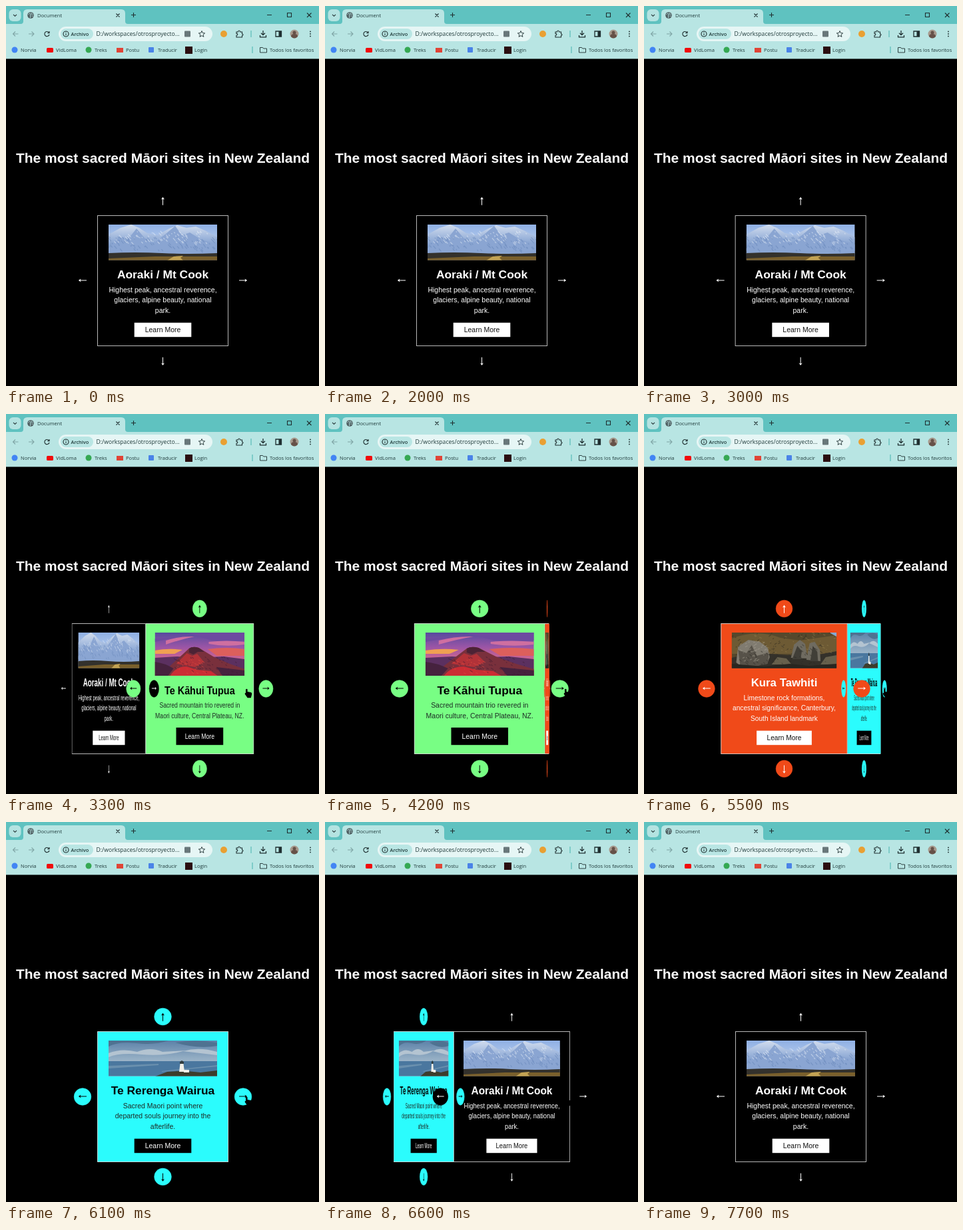
Write an HTML page that moves like this. It is 470 by 572 pixels and loops after 8 s.

```html
<!DOCTYPE html>
<html lang="en">
<head>
<meta charset="utf-8">
<title>Document</title>
<style>
html, body { margin: 0; width: 100%; height: 100%; overflow: hidden; background: #000; }
svg { display: block; }
#stage { position: absolute; left: 0; top: 0; }
text { font-family: "Liberation Sans", Arial, sans-serif; }
#bar text { font: 7.6px "Open Sans", "Noto Sans", sans-serif; fill: #1f3a3a; }
#bar .line { fill: none; stroke: #1f2f30; stroke-width: 1.1; }
.mid { text-anchor: middle; }
</style>
</head>
<body>
<svg id="stage" width="470" height="572" viewBox="0 0 470 572">
  <g id="bar">
    <rect width="470" height="79.500" fill="#b8e5e3"/>
    <path d="M0 0H470V27H183q-4 0-4-4V11q0-6-6-6H32q-6 0-6 6v12q0 4-4 4H0z" fill="#5fc2c0"/>
    <rect x="4.500" y="5" width="18" height="18" rx="6" fill="#b4e3e1"/>
    <path class="line" d="M11 12.800l2.500 2.500 2.500-2.500M165.500 11.500l5 5m0-5l-5 5M188 13.500h7M191.500 10v7M392 13.500h7M422.500 10.500h6v6h-6zM452 10.500l6.500 6.500m0-6.500l-6.500 6.500"/>
    <circle cx="37" cy="14" r="4.800" fill="#4e5d60"/>
    <path d="M33.500 13q2-3 3.500-1t-1 2.500l1 2-1 1.500M38 10.500q0 2 2.500 2M38.500 15h2" fill="none" stroke="#b8e5e3"/>
    <text x="47" y="16.700">Document</text>

    <path class="line" d="M18.500 42h-8m3.500-3.500L10.500 42l3.500 3.500M34 42h8m-3.500-3.500L42 42l-3.500 3.500" style="stroke:#80a6a6"/>
    <path class="line" d="M64.500 40a3.600 3.600 0 1 0 .5 3M65 38v2.700h-2.700"/>
    <rect x="79" y="31" width="231" height="22" rx="11" fill="#e6f6f5"/>
    <rect x="82" y="34" width="49" height="16" rx="8" fill="#b9e6e4"/>
    <circle class="line" cx="90" cy="42" r="4"/>
    <path class="line" d="M90 41.500v2.500M90 39.500v1"/>
    <text x="97.500" y="44.800" style="font-size:7.400px;font-weight:600">Archivo</text>
    <text x="135.500" y="45.200" style="font-size:8.650px">D:/workspaces/otrosproyecto...</text>
    <rect x="268" y="37.500" width="9" height="9" rx="1" fill="#68777a"/>
    <path class="line" d="M294 37.500l1.300 3.100 3.400.3-2.600 2.200.8 3.300-2.900-1.800-2.900 1.800.8-3.300-2.600-2.200 3.400-.3z" style="stroke-width:.9"/>
    <circle cx="327" cy="42" r="5" fill="#e9a032"/>
    <path class="line" d="M346 39h2.500q0-2 1.500-2t1.500 2h3v3q1.500 0 1.500 1.200t-1.500 1.300v2.500h-8.500v-2.800q1.800 0 1.800-1.400T346 41.400z"/>
    <path d="M367.500 37h1v10h-1zM369.500 61h1v10h-1z" fill="#45b3b0"/>
    <path class="line" d="M386 37v6.500m-3-2.800l3 3 3-3M381.500 44v2.800h9V44M405 38h8.500v8H405z" style="stroke-width:1.300"/>
    <path d="M409.500 38h4v8h-4z" fill="#1f2f30"/>
    <circle cx="433" cy="42" r="6.500" fill="#a79a8d"/>
    <path d="M428 46q0-4 5-4t5 4q-5 5-10 0z" fill="#665148"/>
    <circle cx="433" cy="40" r="2.500" fill="#665148"/>
    <path d="M457 38.500v0M457 42v0M457 45.500v0" stroke="#1f2f30" stroke-width="1.800" stroke-linecap="round"/>

    <circle cx="13" cy="66" r="4.500" fill="#4285f4"/>
    <text x="22" y="69">Norvia</text>
    <rect x="61" y="63" width="10" height="7" rx="1.500" fill="#f00a0a"/>
    <text x="75" y="69">VidLoma</text>
    <circle cx="124" cy="66" r="4.500" fill="#35a853"/>
    <text x="133" y="69">Treks</text>
    <rect x="166" y="63" width="10" height="7" fill="#e04436"/>
    <text x="180" y="69">Postu</text>
    <rect x="214" y="62" width="8" height="8" rx="1" fill="#4a83e8"/>
    <text x="228" y="69">Traducir</text>
    <rect x="269" y="61" width="11" height="11" fill="#2a0d10"/>
    <text x="283" y="69">Login</text>
    <path class="line" d="M381.500 62.500h4l1.300 1.500h4.700v6h-10z" style="stroke-width:.9"/>
    <text x="396" y="69">Todos los favoritos</text>
  </g>

  <text class="mid" x="235.500" y="236.200" font-size="21" font-weight="700" fill="#fff">The most sacred Māori sites in New Zealand</text>
  <g id="cube" transform="translate(235.500 413.500)"></g>
  <path id="hand" d="M360 414.500q1.300-1.600 2.600 0v3.500l5.200 1q1.800.5 1.300 3.200l-1.300 5h-5.200l-3.800-5.500q-.6-2 1.200-2z"/>
</svg>

<script>
const HALF = 98.2, LOOP = 8000, TURN_MS = 550;
const STARTS = [2984, 4150, 5355, 6255];
const BODY = '#1d2b25';

const shape = (fill, d) => `<path fill="${fill}" d="${d}"/>`;
const gradient = (id, ...colors) => `<linearGradient id="${id}" x2="0" y2="1">` +
  colors.map((c, i) => `<stop offset="${i / (colors.length - 1)}" stop-color="${c}"/>`).join('') +
  `</linearGradient>`;

let seed = 7;
const random = () => (seed = seed * 16807 % 2147483647) / 2147483647;

// Short slanted flecks that roughen one region of a picture.
function flecks(color, count, x, y, w, h, slant) {
  let d = '';
  for (let i = 0; i < count; i++) {
    const len = 1 + random() * 3;
    d += `M${(x + random() * w).toFixed(1)} ${(y + random() * h).toFixed(1)}l${len.toFixed(1)} ${(len * slant).toFixed(1)}`;
  }
  return `<path d="${d}" stroke="${color}" stroke-width="1.2" stroke-opacity=".5"/>`;
}

const alps = gradient('alpSky', '#8fb0e4', '#dfe8f5') + gradient('alpSnow', '#d3deef', '#9db5db', '#6f90c4') +
  shape('url(#alpSky)', 'M0 0h163v54H0z') +
  shape('url(#alpSnow)', 'M0 15L18 5l16-5 12 5 12 8 15 3 18-10 12-5 14 4 14-2 14 6 18 10v21H0z') +
  shape('#8aa5d2', 'M0 36l16-18 10 8 16-20 12 14 14 8 18-14 14-12 10 14 12-4 16 10 25 8v14H0z') +
  flecks('#eef3fa', 70, 8, 9, 140, 18, 1.1) + flecks('#6584b8', 80, 0, 18, 163, 20, 1.2) +
  shape('#33312c', 'M0 43q40-2 80 0t83 0v11H0z') +
  shape('#7a602c', 'M0 51l70-3 93 0v6H0z') +
  shape('#c3a353', 'M88 54l10-6 14-1-4 3 4 4z');

const volcano = gradient('dusk', '#564a9e', '#9a55a6', '#d8688c', '#ef8848') +
  shape('url(#dusk)', 'M0 0h163v65H0z') +
  shape('#f0a052', 'M0 27q25-4 50-1l-14 6H0z') +
  shape('#6d4aa0', 'M60 0h103v12q-30 3-60 0zM0 9l40-2-40 7z') +
  shape('#cf6fa0', 'M20 12q26-7 52-6-24 4-52 12zM98 14q32-3 65 0v4q-34 4-65-1z') +
  shape('#dc5f5c', 'M96 25q34-4 67 0v10h-50z') +
  shape('#5b3060', 'M0 38l40-2 35 2 50-2 38 4v25H0z') +
  shape('#79303c', 'M24 53l38-29q7-4 18-1l28 14 28 10 27 8v10H14z') +
  shape('#4c2335', 'M62 24q7-4 18-1l10 6-12 0-8 4-8-3z') +
  shape('#b23238', 'M58 31l10 4 9-3 12 12-16 8-34-5z') +
  shape('#cb2d34', 'M28 65q10-14 30-14l18 5 26 2 12 7z') +
  shape('#46223e', 'M0 44q18 2 34 10l-10 11H0zM112 52l51 5v8h-40z') +
  flecks('#e24a3e', 30, 38, 38, 60, 26, .5) + flecks('#3f1b30', 50, 30, 36, 120, 28, .6);

const rocks = shape('#55482c', 'M0 0h163v54H0z') +
  shape('#6d5a34', 'M0 9Q40-6 76 8l30 4 57-8v28H0z') +
  shape('#86a8d0', 'M152 0h11v6l-6-3z') +
  shape('#34312a', 'M0 38q30-8 60-6l60 4 43-8v26H0z') +
  flecks('#2c281c', 90, 0, 0, 163, 50, -.6) + flecks('#94804e', 50, 30, 0, 130, 30, .4) +
  shape('#807b70', 'M7 45l3-24 16-10 18 3 12 9 3 14-4 10-22 4-20-1z') +
  shape('#575249', 'M10 26l13 5 8-12 8 16 19-5-2 17-22 4-21-3z') +
  shape('#6f6b60', 'M92 38l5-20 9-7 8 6 4 22zM116 41l5-25 8-2 8 12 1 17z') +
  shape('#413f38', 'M102 20l7 8-2 12H94zM126 20l7 9 1 14h-12z') +
  shape('#67604c', 'M62 48l9-11 14 2 8 9zM138 48l8-11 17-3v14z') +
  flecks('#a8a293', 40, 12, 14, 44, 30, -.5) + flecks('#2e2c26', 60, 8, 18, 140, 30, .8) +
  shape('#282620', 'M0 47l50 4 40-4 30 3 43-3v7H0z');

const lighthouse = gradient('coast', '#5c81a8', '#94aec4', '#c5d0d8') +
  shape('url(#coast)', 'M0 0h163v54H0z') +
  shape('#4f7291', 'M0 0h90q-20 7-48 4T0 9zM100 3q30-5 63 0v5q-30 5-63-5z') +
  shape('#b4c4d1', 'M0 19q20-8 43-2 20-8 38 0l34-2q-30 9-65 6T0 25zM112 16q24-7 51 1v5z') +
  shape('#4a779f', 'M0 31h163v23H0z') +
  shape('#6a90ae', 'M0 38l75-3v2L0 42zM80 46l83-9v2l-83 8z') +
  shape('#3c3d2c', 'M70 54l18-7 18-1 12 0 20 2 25-3v9z') +
  shape('#f2f0e9', 'M106 47l1.500-12h5l1.500 12zM113 44h8v4h-8z') +
  shape('#303d40', 'M107 35v-3l3-2 3 2v3z');

const sites = [
  { bg: '#000', ink: '#fff', body: '#fff', button: '#fff', label: '#111', photo: alps,
    name: 'Aoraki / Mt Cook',
    lines: ['Highest peak, ancestral reverence,', 'glaciers, alpine beauty, national', 'park.'] },
  { bg: '#78fe84', ink: '#000', body: BODY, button: '#000', label: '#fff', photo: volcano, tall: true,
    name: 'Te Kāhui Tupua',
    lines: ['Sacred mountain trio revered in', 'Maori culture, Central Plateau, NZ.'] },
  { bg: '#f04a19', ink: '#fff', body: '#fff', button: '#fff', label: '#111', photo: rocks,
    name: 'Kura Tawhiti',
    lines: ['Limestone rock formations,', 'ancestral significance, Canterbury,', 'South Island landmark'] },
  { bg: '#2bfcfd', ink: '#000', body: BODY, button: '#000', label: '#fff', photo: lighthouse,
    name: 'Te Rerenga Wairua',
    lines: ['Sacred Maori point where', 'departed souls journey into the', 'afterlife.'] },
];

const label = (y, size, fill, str, weight = 400) =>
  `<text class="mid" y="${y}" font-size="${size}" font-weight="${weight}" fill="${fill}">${str}</text>`;

function panel(s) {
  const h = s.tall ? 65 : 53.5, drop = s.tall ? 11.5 : 0, top = s.tall ? 58.5 : 63.2;
  return `<rect x="-98" y="-98" width="196" height="196" fill="${s.bg}" stroke="#fff" stroke-opacity=".72"/>
    <svg x="-81.5" y="-84.5" width="163" height="${h}">${s.photo}</svg>` +
    label(-3.3 + drop, 17.4, s.ink, s.name, 700) +
    s.lines.map((str, i) => label(17.2 + drop + i * 15.75, 10.5, s.body, str)).join('') +
    `<rect x="-42.800" y="${top}" width="85.600" height="${84.7 - top}" fill="${s.button}"/>` +
    label(s.tall ? 75.3 : 77.8, 10.5, s.label, 'Learn More');
}

// Four round buttons around the card, each with an outward arrow.
const arrows = s => [[0, -1, 0], [1, 0, 90], [0, 1, 180], [-1, 0, 270]].map(([x, y, turn]) =>
  `<g transform="translate(${x * 120.5} ${y * 120.5})">
    <circle r="12.800" fill="${s.bg}" stroke="${s.bg}" stroke-opacity=".6"/>
    <g transform="translate(0 ${x ? -.5 : .8}) rotate(${turn})" fill="${s.ink}">
      <path d="M-.5 6V-4H.5V6zM0-6.200L2.600-2.400 0-3.600-2.600-2.400z"/></g></g>`).join('');

const cube = document.getElementById('cube');
const hand = document.getElementById('hand');
const layer = draw => sites.map(s => {
  const g = document.createElementNS('http://www.w3.org/2000/svg', 'g');
  g.innerHTML = draw(s);
  return cube.appendChild(g);
});
// Buttons stand out past the cube's edges, so they lie above both visible panels.
const layers = [layer(panel), layer(arrows)];

const ease = p => .5 - .5 * Math.cos(Math.PI * Math.min(1, Math.max(0, p)));

function render(t) {
  const turns = STARTS.reduce((sum, s) => sum + ease((t - s) / TURN_MS), 0);
  sites.forEach((_, i) => {
    const angle = (i - turns) * Math.PI / 2;
    const width = Math.cos(angle), shift = HALF * Math.sin(angle);
    for (const faces of layers) {
      faces[i].style.display = width > .005 ? '' : 'none';
      faces[i].setAttribute('transform', `translate(${shift.toFixed(3)} 0) scale(${width.toFixed(5)} 1)`);
    }
  });
  hand.style.display = t >= 3000 ? '' : 'none';
}

const begin = performance.now();
function tick() {
  render((performance.now() - begin) % LOOP);
  requestAnimationFrame(tick);
}
tick();
</script>
</body>
</html>
```
